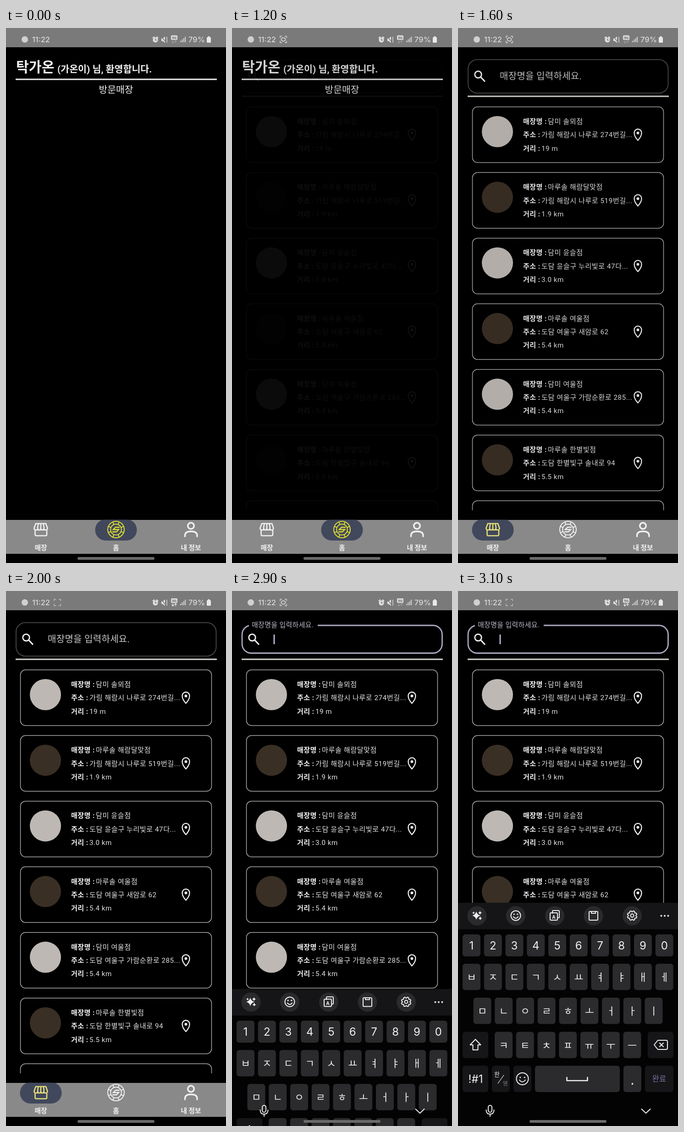
An HTML page for the animation above (3200 ms loop, 480x1167 px).

```html
<!DOCTYPE html>
<html lang="ko">
<head>
<meta charset="utf-8">
<title>매장 검색</title>
<style>
  html, body { margin: 0; width: 100%; height: 100%; overflow: hidden; background: #000; }
  svg { display: block; width: 100vw; height: 100vh; }
  text { font-family: Roboto, 'Noto Sans CJK KR', 'Noto Sans CJK JP', sans-serif; fill: #f0f0f0; white-space: pre; }
  .b { font-weight: 700; }
  .mid { text-anchor: middle; }
  .sys { font-family: Inter, Roboto, sans-serif; font-weight: 500; fill: #d9d9d9; }
  .line { fill: none; stroke: #f0f0f0; stroke-width: 2; stroke-linecap: round; stroke-linejoin: round; }
  .row { font-size: 15.2px; letter-spacing: .5px; fill: #e2e2e2; }
  .row .b { letter-spacing: .3px; fill: #f0f0f0; }
  .key { fill: #2b2b2d; }
  .key.dark { fill: #161619; }
  .cap { font-size: 22px; font-weight: 500; text-anchor: middle; }
  .num { font-family: Inter, Roboto, sans-serif; font-size: 24px; font-weight: 400; }
</style>
</head>
<body>
<svg id="stage" viewBox="0 0 480 1167" preserveAspectRatio="none" xmlns="http://www.w3.org/2000/svg"></svg>
<script>
const LOOP = 3200, STEP = 100;
const FADE = [1100, 700], TAB = [1200, 200], FOCUS = [2700, 150], KEYS = [2780, 300];
const BLINK = 1100, BLINK_AT = 900;
const KEYBOARD_TOP = 680, KEYBOARD_H = 487;

const shops = [
  ['담미 솔뫼점', '가림 해람시 나루로 274번길...', '19 m'],
  ['마루솔 해람달맞점', '가림 해람시 나루로 519번길...', '1.9 km'],
  ['담미 윤슬점', '도담 윤슬구 누리빛로 47다...', '3.0 km'],
  ['마루솔 여울점', '도담 여울구 새암로 62', '5.4 km'],
  ['담미 여울점', '도담 여울구 가람순환로 285...', '5.4 km'],
  ['마루솔 한별빛점', '도담 한별빛구 솔내로 94', '5.5 km'],
  ['', '', '']
];

const text = (x, y, size, str, cls = '', extra = '') =>
  `<text x="${x}" y="${y}" font-size="${size}" class="${cls}" ${extra}>${str}</text>`;
const rect = (x, y, w, h, r, extra = '') =>
  `<rect x="${x}" y="${y}" width="${w}" height="${h}" rx="${r}" ${extra}/>`;
const line = (d, extra = '') => `<path class="line" d="${d}" ${extra}/>`;
const disc = (x, y, r, fill) => `<circle cx="${x}" cy="${y}" r="${r}" fill="${fill}"/>`;
const ring = (x, y, r, extra = '') => `<circle class="line" cx="${x}" cy="${y}" r="${r}" ${extra}/>`;

function statusBar() {
  const bars = [0, 1, 2, 3].map(i =>
    rect(380 + i * 3.4, 28 - i * 3, 2, 3 + i * 3, 0, 'fill="#d0d0d0"')).join('');
  return rect(0, 0, 480, 42, 0, 'fill="#7a7a7a"') +
    disc(41, 25, 7, '#d0d0d0') +
    text(57, 31, 16.5, '11:22', 'sys') +
    `<g id="capture" fill="none" stroke="#d9d9d9">
      <path d="M105 22v-4h4M115 18h4v4M119 28v4h-4M109 32h-4v-4" stroke-width="1.4"/>
      <ellipse id="lens" cx="112" cy="25" rx="4.5" ry="3.6" stroke-width="1.8"/></g>` +
    disc(326, 26, 5.6, '#e0e0e0') +
    `<path d="M320 22l4-3M332 22l-4-3" stroke="#e0e0e0" stroke-width="2.4"/>
     <path d="M326 23v3.5h3" fill="none" stroke="#777" stroke-width="1.5"/>
     <path d="M339 22.5h3l5-4v14l-5-4h-3z" fill="#e0e0e0"/>
     <path d="M339 19l11 13" stroke="#777" stroke-width="1.6"/>
     <path d="M351 19v13" stroke="#d0d0d0" stroke-width="1.6"/>` +
    rect(360, 16, 14, 10, 2, 'fill="#dcdcdc"') +
    text(367, 23.8, 8, '5G', 'b mid', 'style="fill:#666"') +
    `<path id="data" d="M364 27v5m-2.5-2l2.5 3 2.5-3M370 33v-5m-2.5 2l2.5-3 2.5 3" fill="none" stroke="#e0e0e0" stroke-width="1.4"/>` +
    bars + text(398, 31, 16.5, '79%', 'sys') +
    rect(438, 20, 9, 12, 1.5, 'fill="#e8e8e8"') + rect(440.5, 18, 4, 3, 1, 'fill="#e8e8e8"');
}

function homePage() {
  return `<g id="home">` +
    text(22, 96, 30.3, '탁가온', 'b') +
    text(112, 96.5, 20.6, '(가온이) 님, 환영합니다.', 'b') +
    rect(21, 110.5, 439, 3, 0, 'fill="#eee"') +
    text(240, 141.5, 20.4, '방문매장', 'mid') + `</g>`;
}

function card([name, address, distance], i) {
  const y = 172 + i * 143.2;
  const row = (n, label, x, value) => text(142, y + 37 + n * 29.3, 15.2,
    `<tspan class="b">${label} :</tspan><tspan x="${x}">${value}</tspan>`, 'row');
  const box = rect(31.5, y, 417, 121.5, 11, 'fill="none" stroke="#a8a8a8" stroke-width="1.5"');
  if (!name) return box;
  return box + disc(86, y + 54, 34, i % 2 ? '#3a2f24' : '#bdb8b3') +
    row(0, '매장명', 196, name) + row(1, '주소', 182, address) + row(2, '거리', 182, distance) +
    line(`M392.5 ${y + 73}c-5-6-8-10-8-16.5a8 8 0 0 1 16 0c0 6.5-3 10.5-8 16.5z`, 'style="stroke-width:2.3"') +
    disc(392.5, y + 57, 3, '#f0f0f0');
}

function storePage() {
  return `<g id="store">` + rect(0, 42, 480, 1031, 0, 'fill="#000"') +
    `<rect id="field" x="22" width="436.5" rx="20" fill="none"/>
     <rect id="gap" x="37" y="70" width="150" height="9"/>` +
    text(91, 112, 20, '매장명을 입력하세요.', '', 'id="hint" letter-spacing=".3"') +
    rect(90.5, 95, 3, 21, 0, 'id="caret" fill="#b4b0d0"') +
    ring(44, 101.5, 7.3, 'style="stroke-width:2.8"') + line('M49.5 107l8.5 9', 'style="stroke-width:3.2"') +
    rect(21, 147.5, 439, 3, 0, 'fill="#d6d6d0"') +
    `<g clip-path="url(#list)">${shops.map(card).join('')}</g></g>`;
}

function navBar() {
  const spokes = Array.from({ length: 8 }, (_, i) =>
    `<path d="M240 1076v6" transform="rotate(${i * 45 + 22.5} 240 1094)"/>`).join('');
  return rect(0, 1073, 480, 74, 0, 'fill="#898989"') + rect(0, 1147, 480, 20, 0, 'fill="#000"') +
    `<g clip-path="url(#bar)" fill="#41485c">
      <rect id="pillStore" y="1071.5" height="46.5" rx="23"/><rect id="pillHome" y="1071.5" height="46.5" rx="23"/></g>
     <g id="icoStore" fill="none" stroke-width="2.6" stroke-linejoin="round">
      <path d="M65 1081h22l3.5 10q0 4-4 4t-4-3.5q0 3.5-3.3 3.5t-3.3-3.5q0 3.5-3.3 3.5t-3.3-3.5q0 3.5-4 3.5t-4-4z"/>
      <path d="M63.5 1096v9q0 2.500 2.5 2.5h20.5q2.5 0 2.5-2.5v-9M70.5 1081l-1.7 10M76 1081v10M81.5 1081l1.7 10"/></g>
     <g id="icoHome" fill="none" stroke-width="2">
      <circle cx="240" cy="1094" r="18"/><circle cx="240" cy="1094" r="11.8"/>${spokes}
      <path d="M248 1089h-9l-5 5h12l-5 5h-9" stroke-width="2.3"/></g>` +
    ring(403.5, 1086, 6.8, 'style="stroke-width:3.4"') +
    line('M390.5 1109v-2c0-6.5 5.5-9 13-9s13.5 2.5 13.5 9v2', 'style="stroke-width:3.4"') +
    [[76, '매장'], [240, '홈'], [403.5, '내 정보']].map(([x, s]) => text(x, 1139.3, 14.7, s, 'b mid')).join('');
}

function keyboard() {
  const key = (x, y, w, h, dark) => rect(x, y, w, h, 6, `class="key${dark ? ' dark' : ''}"`);
  const row = (chars, x, y, h, cls = '') => [...chars].map((c, i) =>
    key(x + i * 46.75, y, 39, h) + text(x + 19.5 + i * 46.75, y + h / 2 + 8.5, 22, c, 'cap ' + cls)).join('');
  const smile = (x, y, r) => ring(x, y, r) + line(`M${x - r / 2} ${y + 2.5}q${r / 2} ${r * .65} ${r} 0`) +
    disc(x - r * .36, y - 3, 1.6, '#f0f0f0') + disc(x + r * .36, y - 3, 1.6, '#f0f0f0');
  const spark = (x, y, r) => `<path d="M${x} ${y - r}q${r * .2} ${r * .8} ${r} ${r}q${-r * .8} ${r * .2} ${-r} ${r}q${-r * .2} ${-r * .8} ${-r} ${-r}q${r * .8} ${-r * .2} ${r} ${-r}z" fill="#f0f0f0"/>`;
  const teeth = Array.from({ length: 24 }, (_, i) => {
    const r = (i % 3) ? 10.5 : 8, a = i * Math.PI / 12;
    return `${380 + r * Math.sin(a)} ${708 + r * Math.cos(a)}`;
  }).join('L');
  return `<g id="keys">` +
    rect(0, KEYBOARD_TOP, 480, KEYBOARD_H, 0, 'fill="#030304"') +
    rect(0, KEYBOARD_TOP, 480, 58, 0, 'fill="#151518"') +
    [41.5, 126, 211, 295.5, 380].map(x => disc(x, 708.5, 21, '#2a2a2d')).join('') +
    spark(40, 708, 9) + spark(48, 702, 4.5) + spark(48.5, 714, 4) + spark(34, 702, 3) +
    smile(126, 708, 10.5) +
    line('M206 703v-4q0-2 2-2h11q2 0 2 2v12q0 2-2 2h-2M203 702h12q2 0 2 2v12q0 2-2 2h-12q-2 0-2-2v-12q0-2 2-2z') +
    text(209, 714.5, 11, 'A', 'b mid') +
    line('M288 699h15q2 0 2 2v15q0 2-2 2h-15q-2 0-2-2v-15q0-2 2-2zM291 699v4h9v-4') +
    line(`M${teeth}z`) + ring(380, 708, 3.5) +
    [443.5, 451, 458.5].map(x => disc(x, 708.5, 2, '#e8e8e8')).join('') +
    row('1234567890', 10, 749, 48, 'num') +
    row('ㅂㅈㄷㄱㅅㅛㅕㅑㅐㅔ', 10, 813, 57.5) +
    row('ㅁㄴㅇㄹㅎㅗㅓㅏㅣ', 33.5, 887, 57.5) +
    key(10, 961.5, 56, 57.5, true) + row('ㅋㅌㅊㅍㅠㅜㅡ', 80, 961.5, 57.5) + key(414, 961.5, 56, 57.5, true) +
    line('M38 978l11.5 12h-6v11h-11v-11h-6z') +
    line('M436 980h18q3 0 3 3v14q0 3-3 3h-18l-8-10zM440 986l8 8M448 986l-8 8') +
    key(10, 1035.5, 56, 57.5, true) + key(74, 1035.5, 39, 57.5, true) + key(121, 1035.5, 39, 57.5, true) +
    key(168, 1035.5, 185, 57.5) + key(361, 1035.5, 39, 57.5) + key(408, 1035.5, 62, 57.5, true) +
    text(38.5, 1072.5, 22, '!#1', 'cap num') +
    text(85, 1059, 13, '한', 'mid') + line('M87 1074l13-18', 'style="stroke:#bbb;stroke-width:1.3"') +
    text(103, 1079, 12.5, '영', 'mid', 'style="fill:#777"') +
    smile(140.5, 1064, 13) + line('M237.5 1061v7h45v-7', 'style="stroke-width:2.6"') +
    disc(380.5, 1075, 1.9, '#f0f0f0') +
    text(439, 1070, 16.5, '완료', 'mid', 'style="fill:#7775a0"') + `</g>` +
    `<g id="keyNav">` + rect(66, 1122, 8, 15, 4, 'class="line"') +
    line('M61.5 1132q0 9 8.5 9t8.5-9M70 1141v5') +
    line('M400.5 1130l9.5 9 9.5-9') + `</g>`;
}

const stage = document.getElementById('stage');
stage.innerHTML = `<defs>
    <clipPath id="list">${rect(0, 160, 480, 892, 0)}</clipPath>
    <clipPath id="bar">${rect(0, 1072.5, 480, 74, 0)}</clipPath></defs>` +
  rect(0, 0, 480, 1167, 0, 'fill="#000"') +
  homePage() + storePage() + navBar() + keyboard() + statusBar() +
  rect(156, 1154, 168, 6, 3, 'fill="#6a6a6a"');

const parts = Object.fromEntries([...stage.querySelectorAll('[id]')].map(el => [el.id, el]));
const set = (id, attrs) => { for (const k in attrs) parts[id].setAttribute(k, attrs[k]); };
const clamp = v => Math.min(1, Math.max(0, v));
const mix = (a, b, p) => a + (b - a) * p;
const blend = (a, b, p) => `rgb(${a.map((v, i) => Math.round(mix(v, b[i], p)))})`;

// cubic-bezier(.4, 0, .2, 1)
function ease(x) {
  if (x <= 0 || x >= 1) return clamp(x);
  let lo = 0, hi = 1, u = .5;
  for (let i = 0; i < 24; i++) {
    u = (lo + hi) / 2;
    const bx = 1.2 * u * (1 - u) ** 2 + .6 * u * u * (1 - u) + u ** 3;
    if (bx < x) lo = u; else hi = u;
  }
  return 3 * u * u * (1 - u) + u ** 3;
}
const phase = (t, [start, length]) => ease((t - start) / length);

const WHITE = [240, 240, 240], YELLOW = [220, 218, 50], PALE = [228, 220, 120];

function draw(t) {
  const fade = phase(t, FADE);
  set('home', { opacity: 1 - fade });
  set('store', { opacity: fade });

  const tab = phase(t, TAB);
  set('pillHome', { x: 240 - 45.5, width: 91, opacity: 1 - tab });
  set('pillStore', { x: mix(76, 30.5, tab), width: 91 * tab, opacity: tab });
  set('icoHome', { stroke: blend(YELLOW, WHITE, tab) });
  set('icoStore', { stroke: blend(WHITE, PALE, tab) });

  const focus = phase(t, FOCUS);
  set('field', {
    y: mix(69, 75, focus), height: mix(73, 60.5, focus),
    stroke: blend([88, 88, 88], [170, 168, 192], focus), 'stroke-width': mix(1.5, 2.8, focus)
  });
  set('gap', { opacity: focus });
  set('hint', { x: mix(91, 43, focus), y: mix(112, 79.3, focus), 'font-size': mix(20, 15, focus) });
  parts.hint.style.fill = blend([200, 200, 200], [184, 182, 198], focus);
  set('caret', { opacity: focus < 1 ? 0 : 1 });

  const rise = phase(t, KEYS);
  set('keys', { transform: `translate(0 ${KEYBOARD_H * (1 - rise)})` });
  set('keyNav', { opacity: clamp(rise * 4) });

  const away = Math.abs(t - BLINK_AT - BLINK * Math.round((t - BLINK_AT) / BLINK));
  set('capture', { opacity: t < 200 ? 0 : away < 50 ? .75 : 1 });
  set('lens', { opacity: clamp((away - 40) / 60) });
  set('data', { opacity: away < 150 ? 1 : .3 });
}

const start = performance.now();
function tick() {
  const t = (performance.now() - start) % LOOP;
  draw(Math.floor(t / STEP) * STEP);
  requestAnimationFrame(tick);
}
tick();
</script>
</body>
</html>
```
